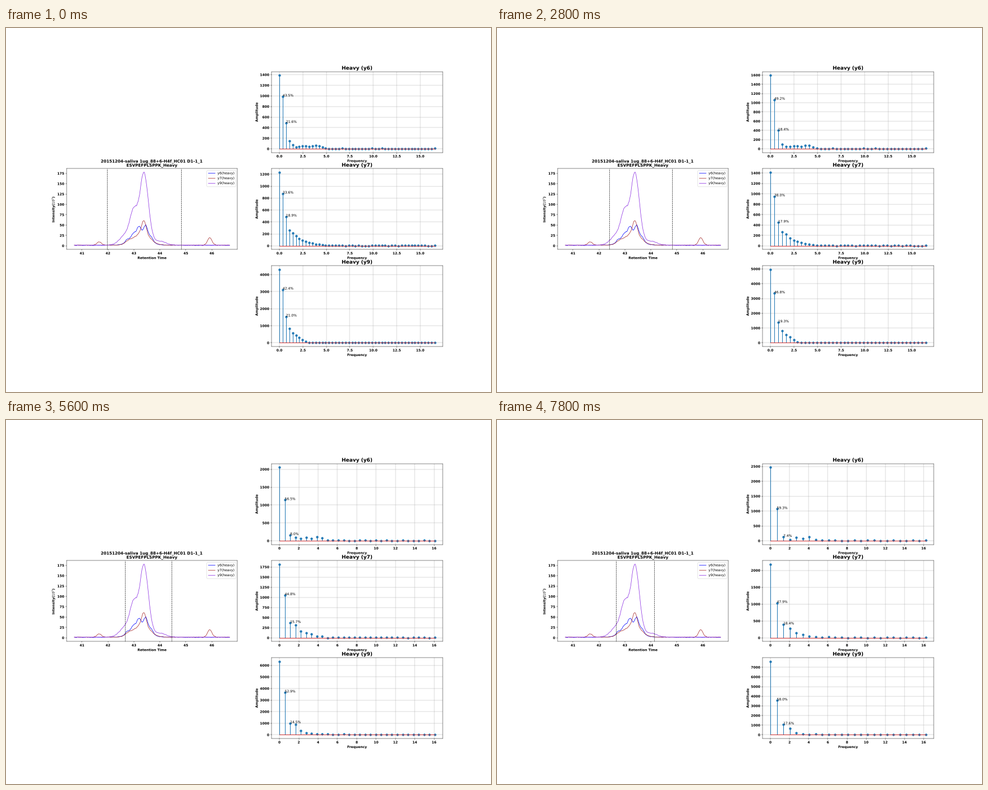
These frames come from a looping animation (864 px wide and 648 px high, 8000 ms). A matplotlib script:

```python
import numpy as np
import matplotlib.pyplot as plt
from matplotlib.animation import FuncAnimation
from matplotlib.patheffects import Normal
from matplotlib.text import Text

plt.rcParams.update({
    "font.family": "DejaVu Sans", "font.size": 10, "text.hinting": "none",
    "axes.labelweight": "bold", "axes.titleweight": "bold",
})

FRAMES, INTERVAL = 40, 200
DT = 0.02959                    # minutes between two scans
START, SCANS = 40.707, 203
LEFT_STOP, RIGHT_STOP = 42.65, 44.815
SWITCH = 16                     # step at which trimming changes sides

# Per ion: colour, baseline, ripple, then bells of (height, centre, width)
IONS = {
    "y6": ("blue", 1.1, 0.1,
           [(34, 43.46, .119), (38, 43.153, .151), (13, 42.81, .13),
            (10, 43.67, .13), (3, 43.22, .6)]),
    "y7": ("brown", 1.6, 0,
           [(30, 43.381, .085), (30, 43.327, .281), (8, 42.81, .15),
            (8, 41.66, .085), (18, 45.92, .085)]),
    "y9": ("blueviolet", 1.4, 0,
           [(174, 43.385, .1686), (67, 42.985, .135), (27, 42.715, .235),
            (10, 43.955, .26)]),
}

rng = np.random.default_rng(6)
times = START + DT * np.arange(SCANS)


def make_trace(base, ripple, bells):
    y = sum(h * np.exp(-((times - c) / w) ** 2 / 2) for h, c, w in bells)
    y = base + y * (1 + ripple * np.cos(2 * np.pi * 3.95 * (times - 43.457)))
    return np.maximum(y + rng.normal(0, 0.15 + 0.08 * np.sqrt(y)), 0)


def window(step):
    """Scan count and the two borders of the trimmed window."""
    if step < SWITCH:
        n = 96 - step
        return n, RIGHT_STOP - n * DT, RIGHT_STOP
    n = 89 - step
    return n, LEFT_STOP, LEFT_STOP + n * DT


def spectrum(trace, step):
    n, begin, _ = window(step)
    first = round((begin - START) / DT)
    count = (n + 1) // 2 if step < SWITCH else n // 2
    amp = 100 * np.abs(np.fft.rfft(trace[first:first + n]))[:count] / n
    return np.arange(count) / (n * DT), amp


def bold_ticks(ax):
    plt.setp(ax.get_xticklabels() + ax.get_yticklabels(), weight="bold")


fig = plt.figure(figsize=(20, 15), dpi=43.2)
grid = fig.add_gridspec(3, 2, left=.125, right=.9, bottom=.125, top=.88,
                        wspace=.2, hspace=.2)
chrom = fig.add_subplot(grid[1, 0])
panels = [fig.add_subplot(grid[row, 1]) for row in range(3)]

traces = {}
for name, (color, *shape) in IONS.items():
    traces[name] = make_trace(*shape)
    chrom.plot(times, traces[name], color=color, lw=1.25,
               label=f"{name}(heavy)")
borders = [chrom.axvline(t, color="black", ls="--", lw=1.1)
           for t in window(0)[1:]]
chrom.set_xlim(40.408, 46.989)
chrom.set_ylim(-9, 186.3)
chrom.set_title("20151204-saliva 1ug_88+6-H4f_HC01 D1-1_1\nESVPEFPLSPPK_Heavy",
                fontsize=12, linespacing=1.05)
chrom.set_xlabel("Retention Time")
chrom.set_ylabel("Intensity($10^2$)", labelpad=2.5)
chrom.legend(loc="upper right")
bold_ticks(chrom)


def draw_panel(ax, name, step):
    freq, amp = spectrum(traces[name], step)
    ax.clear()
    stems = ax.stem(freq, amp).stemlines
    stems.set_linewidth(1.7)
    ax.grid(True)
    for i in (1, 2):
        ax.text(freq[i], amp[i], f"{amp[i] / amp[1:].sum():.1%}")
    ax.set_title(f"Heavy ({name})", fontsize=15)
    ax.set_xlabel("Frequency")
    ax.set_ylabel("Amplitude")
    bold_ticks(ax)


def update(step):
    for line, t in zip(borders, window(step)[1:]):
        line.set_xdata([t, t])
    for ax, name in zip(panels, IONS):
        draw_panel(ax, name, step)
    # Outline text keeps small letters at sub-pixel positions
    for text in fig.findobj(Text):
        text.set_path_effects([Normal()])
    return []


anim = FuncAnimation(fig, update, frames=FRAMES, interval=INTERVAL,
                     repeat=True, blit=False)
plt.show()
```
